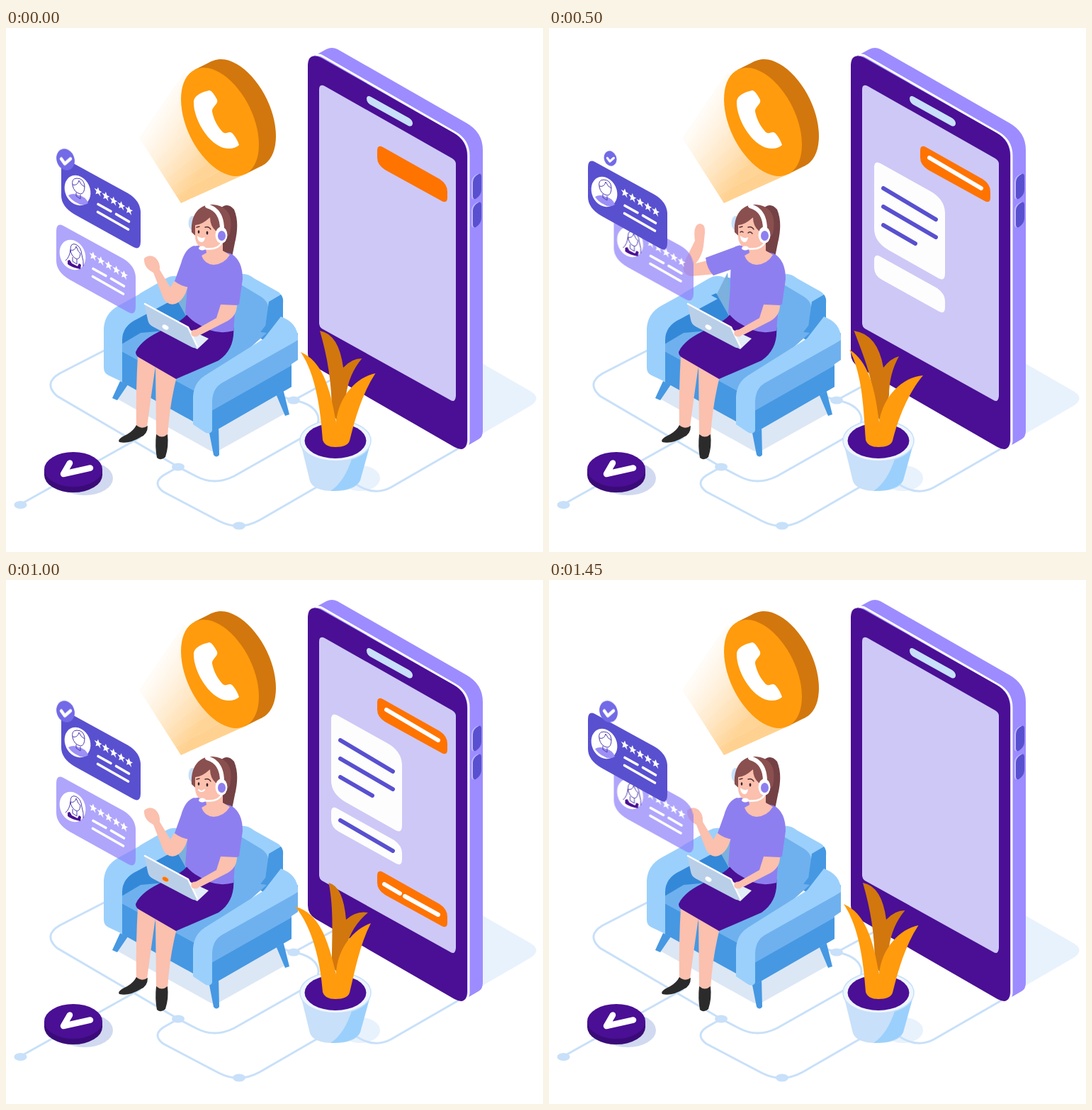
These frames come from a looping animation (758x739 px, 1500 ms). An HTML page:

```html
<!DOCTYPE html>
<html lang="en">
<head>
<meta charset="utf-8">
<title>Support desk</title>
<style>
html, body { margin: 0; width: 100%; height: 100%; overflow: hidden; background: #fff; }
svg { display: block; width: 758px; height: 739px; }
.deep { fill: #4a0f94; } .violet { fill: #5850cf; } .lilac { fill: #8e7ff0; }
.orange { fill: #ff9b0c; } .rust { fill: #d2770d; } .hot { fill: #ff7300; }
.ice { fill: #c8e0f9; } .sky { fill: #9bd0fc; } .mid { fill: #6fb1ee; } .blue { fill: #4698e2; }
.skin { fill: #fbc0ae; } .white { fill: #fff; } .paper { fill: #fdfdfd; } .hair { fill: #8a4f4f; }
.line { fill: none; stroke: #fff; stroke-width: 6; stroke-linecap: round; stroke-linejoin: round; }
.ink { stroke: #5850cf; }
.road { fill: none; stroke: #c8e0f9; stroke-width: 3; }
.thin { fill: none; stroke: #4d3bb0; stroke-width: 1; }
.face { fill: none; stroke: #54302f; stroke-width: 1.4; stroke-linecap: round; }
</style>
</head>
<body>
<svg viewBox="0 0 758 739">
<defs>
  <linearGradient id="fade" gradientUnits="userSpaceOnUse" x1="198" y1="122" x2="290" y2="180">
    <stop offset="0" stop-color="#ff9b0c" stop-opacity="0"/>
    <stop offset="1" stop-color="#ff9b0c"/>
  </linearGradient>
  <path id="star" d="M0-6 1.8-2 6-2 2.6 1 4 5.5 0 2.8-4 5.5-2.6 1-6-2-1.8-2z"/>
  <path id="card" d="M78 195Q78 182 88 187L172 233Q189 243 190 259V301Q190 314 180 309L97 263Q78 252 78 236z"/>
  <path id="pill" d="M524 173Q524 164 532 168L612 213Q623 220 623 231V239Q623 248 615 244L535 200Q524 193 524 183z"/>
  <g id="review">
    <ellipse class="white" cx="101" cy="229" rx="17.5" ry="22" transform="rotate(-25 101 229)"/>
    <g id="stars" class="white"></g>
    <path class="line" style="stroke-width:3.6" d="M130 248.500 148 258.500M155.500 262.500 173.500 273M129.500 259.500 172.500 284"/>
  </g>
  <g id="man">
    <use href="#card" class="violet"/><use href="#review"/>
    <path d="M88 236Q95 232 103 236 113 238 116 247 108 252 101 247 92 243 88 236z" fill="#9c8ff5"/>
    <path class="thin" d="M94 222Q92 212 100 212 110 212 111 223 111 234 105 234 96 232 94 222zM94 221Q101 223 103 215 106 222 111 224M99 232V237L105 241V235"/>
  </g>
  <g id="woman">
    <use href="#card" transform="translate(-7 92)" fill="#8e7ffa" opacity=".7"/>
    <use href="#review" transform="translate(-7 91)"/>
    <path class="deep" d="M87 328 90 327 93 332 101 336 103 332 106 334 105 340Q93 338 87 333z"/>
    <path class="thin" d="M91 312Q91 303 98 305 106 308 107 320 110 329 109 336M91 312Q90 323 84 328M91 313Q97 315 99 308 102 316 105 318 104 328 98 325 92 321 91 313M94 323V329L100 333V326"/>
  </g>
  <g id="dial">
    <ellipse class="orange" cx="302" cy="132.5" rx="46.7" ry="81.8" transform="rotate(-25.6 302 132.5)"/>
    <path class="white" d="M265 103C266 95 277 90 287 88Q291 88 298 101C300 108 290 111 291 118 294 132 300 140 306 147 312 151 315 144 320 149Q326 156 329 165C322 172 308 171 300 166 279 154 264 123 265 103z"/>
  </g>
  <g id="puck">
    <ellipse class="deep" cx="95" cy="622.5" rx="41" ry="24.5"/>
    <path class="line" style="stroke-width:8.5" d="M90 613.500 81 629 119 620.500"/>
  </g>
  <g id="tick">
    <ellipse rx="12.5" ry="15.5" fill="#726ae6" transform="rotate(-20)"/>
    <path class="line" style="stroke-width:4.5" d="M-6-1-1 6 7-1"/>
  </g>
  <path id="key" d="M659 218Q659 210 667 206 671 204 671 210V228Q671 236 663 241 659 242 659 237z"/>
</defs>

<!-- floor -->
<path fill="#e8f2fc" d="M660 466 740 512Q757 522 740 533L645 588z"/>
<ellipse cx="500" cy="635" rx="28" ry="18" fill="#e8f2fc"/>
<ellipse cx="111" cy="635" rx="40" ry="24" fill="#d0d9ef"/>
<path fill="#dce7f5" d="M167 503 155 522 288 596Q296 599 302 595L395 543 390 505 280 480z"/>
<path class="road" d="M20 672 190 577M150 449 76 487Q52 501 72 519L243 619 268 632Q294 646 322 632L428 572Q445 560 440 546 434 530 406 525L380 517M406 525 465 493M243 619 222 631Q206 642 222 654L300 695Q329 710 358 694L455 638M478 634 500 647Q522 659 543 648L642 591"/>
<g class="ice"><ellipse cx="20.500" cy="672.500" rx="9" ry="5.500"/><ellipse cx="243" cy="619" rx="9" ry="5.500"/><ellipse cx="329" cy="702" rx="9" ry="5.500"/><ellipse cx="406" cy="525" rx="9" ry="5.500"/></g>

<!-- phone -->
<path fill="#9c8cff" d="M432 41 452 30Q460 26 468 30L650 134Q673 147 673 172V568Q673 577 667 580L643 594 500 300z"/>
<path fill="none" stroke="#fff" stroke-width="3" d="M437 38Q443 37 449 41L633 147Q653 158 653 180V583Q652 590 648 593"/>
<path class="deep" d="M426 52Q427 34 445 42L632 148Q651 159 651 181V581Q650 600 633 591L437 478Q426 471 426 459z"/>
<path fill="#cec8f7" d="M442 87Q442 78 450 82L630 184Q635 187 635 192V519Q634 530 626 524L446 424Q442 421 442 416z"/>
<path class="ice" d="M509 99Q510 94 515 97L569 127Q574 130 574 135 573 140 568 138L514 108Q509 105 509 99z"/>
<g fill="#c3baff"><use href="#key" x="-2"/><use href="#key" x="-2" y="40"/></g>
<g class="violet"><use href="#key"/><use href="#key" y="40"/></g>

<!-- chat -->
<g data-on="0-1400">
  <use href="#pill" class="hot"/>
  <path class="line" data-on="150-1500" d="M537 183 610 226"/>
</g>
<path class="paper" data-on="200-1400" d="M459 197Q459 186 468 191L538 230Q558 241 559 260V346Q559 358 550 353L479 313Q459 301 459 283z"/>
<path class="line ink" data-on="300-1400" d="M472 226 546 270"/>
<path class="line ink" data-on="350-1400" d="M472 252 546 295"/>
<path class="line ink" data-on="400-1400" d="M472 278 517 304"/>
<path class="paper" data-on="500-1400" d="M459 328Q459 318 467 322L548 367Q559 375 559 385V394Q559 404 551 400L470 355Q459 349 459 338z"/>
<path class="line ink" data-on="600-1400" d="M472 339 546 382"/>
<use href="#pill" class="hot" y="244" data-on="700-1400"/>
<path class="line" data-on="750-1400" d="M534 429 556 442"/>
<path class="line" data-on="850-1400" d="M563 446 610 472"/>

<!-- armchair -->
<path class="blue" d="M161 498 172 503 157 525 150 522zM286 566 300 560 301 602Q297 607 293 602zM381 516 391 509 400 545 394 547z"/>
<path class="sky" d="M188 375 226 353Q238 346 252 354L320 352Q335 341 350 353L384 372Q391 376 391 387L378 430 250 425z"/>
<path class="mid" d="M252 352 325 358 360 379Q371 386 370 396L364 432 235 430 236 380z"/>
<path class="blue" d="M371 386 388 376Q392 380 391 390L391 416 370 446 355 434 366 420z"/>
<path fill="#7bb1dc" d="M237 375 252 345 258 405 236 402z"/>
<path fill="#3488d8" d="M160 432 170 402 236 374 262 420 175 462 160 455z"/>
<path class="mid" d="M163 446 190 430 300 420 368 430 290 500 264 536 163 482z"/>
<path class="blue" d="M163 456 266 512V556L163 499z"/>
<path class="sky" d="M138 424Q139 403 158 392L207 365 238 382 186 410Q164 420 164 440V499L145 490Q138 487 138 479z"/>
<path class="mid" d="M290 500 412 430 412 468 403 474V506L290 571z"/>
<path class="blue" d="M290 540 403 476V506L290 571z"/>
<path class="sky" d="M264 520Q265 500 281 490L364 438 388 407Q413 416 412 440L402 446 304 501Q292 508 291 526V568Q287 575 279 569L264 559z"/>

<!-- agent -->
<path class="skin" d="M186 462 212 470Q206 510 199 563 192 569 184 563 183 515 186 462zM211 472 241 492Q231 530 228 576 220 582 212 576z"/>
<path fill="#2b2b2b" d="M184 560Q192 567 200 561 200 573 190 577 174 587 160 584 156 580 171 573 180 568 184 560zM212 573Q220 580 228 573 230 590 225 605 219 611 213 606 210 590 212 573z"/>
<path fill="#744145" d="M303 254Q313 245 322 256 330 275 323 303L319 323 300 312z"/>
<ellipse class="ice" cx="263" cy="275" rx="5.500" ry="10"/>
<path class="hair" d="M262 288C260 262 274 248 292 249 314 251 321 266 316 290L306 303 280 305z"/>
<path class="deep" d="M256 403C244 422 196 428 183 457Q183 463 190 466L240 495 300 469Q324 453 321 420z"/>
<path class="lilac" d="M277 306 263 308Q255 330 256 365L253 402Q262 413 272 418 295 434 321 427L324 391 329 390 334 354Q334 327 317 318L300 314z"/>
<path class="skin" d="M281 305 306 298 306 314 316 320Q308 333 293 334 280 333 276 321L283 317z"/>
<path class="skin" d="M267 278 290 266 307 283 305 303Q296 315 282 312 267 309 267 293z"/>
<path class="hair" d="M262 288Q262 264 284 255L303 268 302 290 296 286Q288 279 288 267 276 278 267 278 263 279 262 288z"/>
<path class="line" d="M284 251Q305 257 305 284"/>
<ellipse class="white" cx="304" cy="292" rx="8.500" ry="11.500"/>
<ellipse class="lilac" cx="304.500" cy="293" rx="5.500" ry="7"/>
<path class="line" style="stroke-width:2.500" d="M305 302Q299 314 280 311"/>
<ellipse class="white" cx="277" cy="310.500" rx="5" ry="3"/>
<path class="face" d="M269 281 273 280M281 281Q286 279 289 284"/>
<g data-on="0-450 650-1150 1300-1500" fill="#38222a"><ellipse cx="272" cy="287.500" rx="1.300" ry="2.300"/><ellipse cx="284" cy="289" rx="1.400" ry="2.400"/></g>
<path class="face" data-on="450-650 1150-1300" d="M270 288Q272 286 274 288M281 289Q284 286 287 290"/>
<path class="white" data-on="0-150 450-700 1150-1500" d="M270 293Q275 298 281 295 280 303 275 302 270 300 270 293z"/>
<path class="line" data-on="150-450 700-1150" style="stroke-width:2" d="M272 296Q276 300 280 296"/>

<g data-on="0-350 850-1500">
  <path class="skin" d="M237 357 257 363Q252 384 239 389 228 392 222 381L208 345Q194 338 195 325 203 318 211 324 218 331 217 341L232 366z"/>
  <path class="lilac" d="M266 307Q253 310 247 332L238 357Q246 364 260 366L270 330z"/>
</g>
<g data-on="350-850">
  <path class="skin" d="M223 328 234 347 201 350Q187 348 190 332L206 300Q203 278 212 276 221 275 220 289L218 308Q216 322 207 332z"/>
  <path class="lilac" d="M270 306 221 324Q223 340 232 349L262 339z"/>
</g>

<path class="skin" d="M303 390 326 391Q326 405 313 413L272 434Q259 440 258 431L297 409z"/>
<path fill="#e3edf8" d="M256 424 286 438 270 453 255 445z"/>
<path fill="#b9cfe8" d="M195 388 257 421 271 449Q268 453 262 450L207 421Q201 418 200 411z"/>
<path class="line" style="stroke-width:2.500" d="M196 389 257 422 270 449"/>
<path class="skin" d="M262 427Q270 423 276 430L270 435Q259 437 262 427z"/>
<g transform="rotate(28 225 422)">
  <ellipse class="white" cx="225" cy="422" rx="4.800" ry="3"/>
  <ellipse class="hot" cx="225" cy="422" rx="4.800" ry="3" data-on="150-450 700-1150"/>
</g>

<!-- plant -->
<path class="ice" d="M415 582 429 639Q434 653 463 653 492 653 499 640L515 582z"/>
<path class="sky" d="M515 584 500 638Q492 653 458 653 478 640 489 605z"/>
<ellipse cx="465" cy="582" rx="50" ry="29" fill="#eef6fe" stroke="#c8e0f9" stroke-width="1.500"/>
<ellipse class="deep" cx="465" cy="582" rx="43.500" ry="25"/>
<g id="plant"></g>

<!-- reviews -->
<use href="#woman" data-on="0-200 650-1400"/>
<use href="#man" data-on="0-200 650-1400"/>
<use href="#woman" x="20.500" y="-18" data-on="200-650 1400-1500"/>
<use href="#man" x="-23" y="2" data-on="200-650 1400-1500"/>
<use href="#tick" x="84" y="185.500" data-on="0-200 650-1500"/>
<use href="#tick" transform="translate(86.500 184) scale(.7)" data-on="200-650"/>

<!-- round buttons -->
<g id="rays" fill="url(#fade)"></g>
<ellipse class="rust" cx="326" cy="120.500" rx="46.700" ry="81.800" transform="rotate(-25.600 326 120.500)"/>
<g data-on="0-150 400-650 900-1150 1400-1500">
  <path class="rust" d="M337.800 206 361.800 194 290 47 266 59z"/>
  <use href="#dial"/>
</g>
<g data-on="150-400 650-900 1150-1400">
  <path class="rust" d="M349.800 200 361.800 194 290 47 278 53z"/>
  <use href="#dial" x="12" y="-6"/>
</g>
<ellipse cx="95" cy="630.500" rx="41" ry="24.500" fill="#3a0b78"/>
<g data-on="0-150 400-650 900-1150 1400-1500">
  <path fill="#3a0b78" d="M54 622H136V631H54z"/>
  <use href="#puck"/>
</g>
<use href="#puck" y="6" data-on="150-400 650-900 1150-1400"/>
</svg>
<script>
const LOOP = 1500;
const $ = id => document.getElementById(id);
const mix = (a, b, k) => a.map((v, i) => v + (b[i] - v) * k);

// k: -1 sways left, 0 rests, 1 sways right
function leaves(k, spans) {
  const back = `M${443 - 12.5 * k} 427Q${470 - 6 * k} 432 ${476 - 4 * k} 479 ${488 - 6 * k} 466 ${502.5 - 8.5 * k} ${466 - 3 * k}
    Q${484 - 4 * k} 488 480 518L470 556 460 545C460 500 ${454 - 9 * k} 465 ${443 - 12.5 * k} 427z`;
  const front = `M${416 + 8 * k} ${457 - 3.5 * k}C${446 + 4 * k} 470 ${457 + 3 * k} 505 466 556
    C${469 + 2 * k} 520 ${495 + 4 * k} 492 ${521.5 + 6.5 * k} ${487 + 3 * k}C${503 + 4 * k} 515 493 550 485 582
    Q482 591 465 591 450 591 447 581C444 540 ${438 + 5 * k} 490 ${416 + 8 * k} ${457 - 3.5 * k}z`;
  return `<g data-on="${spans}"><path class="rust" d="${back}"/><path class="orange" d="${front}"/></g>`;
}
$('plant').innerHTML = leaves(0, '0-150 650-900 1400-1500')
  + leaves(-1, '150-400 900-1150') + leaves(1, '400-650 1150-1400');

const five = [0, 1, 2, 3, 4];
$('stars').innerHTML = five.map(i =>
  `<use href="#star" transform="matrix(.9 .45 0 1 ${130 + i * 10.9} ${230.5 + i * 6.6})"/>`).join('');

const BANDS = 8;
$('rays').innerHTML = Array.from({ length: BANDS }, (_, i) => {
  const edge = k => [mix([188, 155], [247, 247], k), mix([252, 62], [338, 206], k)];
  const [a, b] = edge(i / BANDS), [c, d] = edge((i + 1) / BANDS);
  return `<path opacity="${0.28 + i * 0.025}" d="M${a}L${b} ${d} ${c}z"/>`;
}).join('');

for (const el of document.querySelectorAll('[data-on]')) {
  const spans = el.dataset.on.split(' ').map(s => s.split('-').map(Number));
  const shown = t => spans.some(([a, b]) => t >= a && t < b) ? 1 : 0;
  const times = [...new Set([0, ...spans.flat(), LOOP])].sort((a, b) => a - b);
  const frames = times.map(t => ({ offset: t / LOOP, opacity: shown(t), easing: 'steps(1, end)' }));
  el.animate(frames, { duration: LOOP, iterations: Infinity });
}
</script>
</body>
</html>
```
